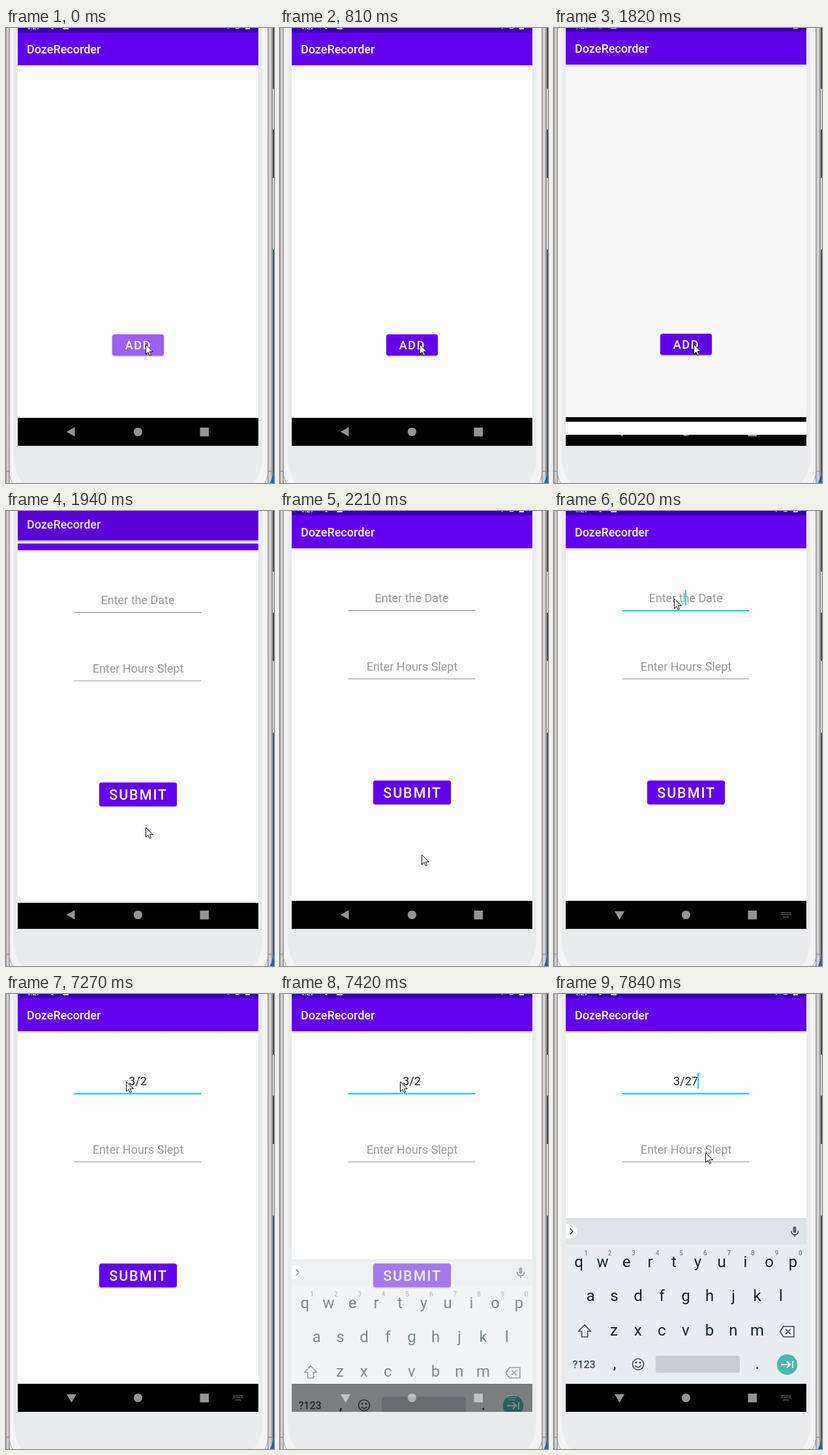
Recreate the animation shown at these times as an HTML page. Size 411 px wide and 698 px high, loop 7.99 s.

```html
<!DOCTYPE html>
<html lang="en">
<head>
<meta charset="utf-8">
<title>Phone form</title>
<style>
html, body { margin: 0; width: 100%; height: 100%; overflow: hidden; background: #e9ebec; }
svg { display: block; width: 411px; height: 698px; font-family: Roboto, sans-serif; }
.title { font-weight: 500; font-size: 18px; fill: #fff; }
.btn { font-weight: 500; letter-spacing: .0893em; fill: #fff; }
.raised { filter: drop-shadow(0 1px 1px rgba(0, 0, 0, .35)); }
.field { font-size: 18px; text-anchor: middle; }
.hint { fill: #9b9b9b; }
.key { font-size: 24px; text-anchor: middle; fill: #14242b; }
.alt { font-size: 10px; font-weight: 500; text-anchor: middle; fill: #7d868b; }
.icon { fill: none; stroke: #3f4b50; stroke-width: 1.6; stroke-linejoin: round; stroke-linecap: round; }
</style>
</head>
<body>
<svg viewBox="0 0 411 698">
  <defs>
    <clipPath id="screen"><rect x="18" y="0" width="369" height="641"/></clipPath>
    <clipPath id="reveal"><rect id="revealBox" x="18" y="0" width="369" height="641"/></clipPath>
    <linearGradient id="barShadow" x1="0" y1="0" x2="0" y2="1">
      <stop offset="0" stop-opacity=".2"/><stop offset="1" stop-opacity="0"/>
    </linearGradient>
    <g id="bars">
      <rect x="18" y="-20" width="369" height="27" fill="#3700b3"/>
      <g fill="#e8e0f8">
        <text x="31" y="1.6" font-size="11" font-weight="500">4:27</text>
        <rect x="69.5" y="-1" width="3" height="2.5"/>
        <rect x="87" y="-2" width="9" height="4" rx="1"/>
        <rect x="340" y="-1" width="1.5" height="2"/>
        <rect x="352" y="-1" width="6" height="2"/>
        <rect x="367" y="-2" width="7" height="4"/>
      </g>
      <rect x="18" y="57" width="369" height="4" fill="url(#barShadow)"/>
      <rect x="18" y="6.6" width="369" height="50.4" fill="#6200ee"/>
      <text class="title" x="32" y="38.5">DozeRecorder</text>
    </g>
  </defs>

  <g id="frame"></g>

  <g clip-path="url(#screen)">
    <rect x="18" y="0" width="369" height="641"/>
    <g id="home">
      <rect x="18" y="-20" width="369" height="618" fill="#fefefe"/>
      <use href="#bars"/>
      <rect id="add" class="raised" x="163" y="470" width="79" height="32.5" rx="3.5"/>
      <text class="btn" x="182.7" y="493" font-size="18">ADD</text>
    </g>
    <rect id="dim" x="18" y="0" width="369" height="598"/>

    <g fill="#949494">
      <path id="back"/>
      <circle cx="202.4" cy="619.5" r="6.6"/>
      <rect x="297.5" y="613" width="13.5" height="13.5"/>
      <path id="imeIcon" fill="none" stroke="#949494" stroke-width="1.6" stroke-dasharray="1.6 1.4"
        d="M349 616.3h14M349 619.3h14M352 622.8h8"/>
    </g>

    <g id="form" clip-path="url(#reveal)">
      <g id="formBody">
        <rect x="18" y="0" width="369" height="598" fill="#fefefe"/>
        <use href="#bars"/>
        <text id="date" class="field" x="202" y="140"></text>
        <rect id="line" x="104.5" width="195"/>
        <rect id="caret" y="121" width="1.8" height="24" fill="#03dac5"/>
        <text class="field hint" x="202.5" y="245">Enter Hours Slept</text>
        <rect x="104.5" y="257" width="195" height="1.1" fill="#a2a2a2"/>
        <rect class="raised" x="143" y="413.5" width="119" height="36.5" rx="3.5" fill="#6200ee"/>
        <text class="btn" x="158.2" y="440" font-size="21.55">SUBMIT</text>
      </g>
    </g>

    <g id="keyboard"></g>
  </g>

  <path id="pointer" d="M0 0V14.9L3.5 11.7L5.8 16.9L8 16L5.8 10.9H10.8Z"
    fill="#fff" stroke="#111" stroke-linejoin="round"/>
</svg>
<script>
const $ = id => document.getElementById(id);
const set = (id, attrs) => { for (const k in attrs) $(id).setAttribute(k, attrs[k]); };
const rect = (x, y, w, h, fill, extra = '') =>
  `<rect x="${x}" y="${y}" width="${w}" height="${h}" fill="${fill}" ${extra}/>`;
const label = (cls, x, y, s) => `<text class="${cls}" x="${x}" y="${y}">${s}</text>`;

function buildFrame() {
  const column = ([x, w, c]) => rect(x, 0, w, 698, c);
  const edges = [
    [0, 1, '#989395'], [1, 3, '#d5d0d1'], [4, 2, '#a8a2a4'],
    [401, 2, '#a8a2a4'], [403, 4, '#d5d0d1'], [407, 2.5, '#989395']
  ];
  const desktop = [[0, 93, '#23262b'], [93, 63, '#d4d6d8'], [156, 74, '#1c1e26'],
                   [230, 110, '#dddee0'], [340, 358, '#14384a']];
  $('frame').innerHTML =
    rect(0, 0, 411, 698, '#f4f4f5') + edges.map(column).join('') +
    '<path d="M12 0H393V658Q392 684 380 698H25Q13 684 12 658Z" fill="#e9ebec"/>' +
    desktop.map(([y, h, c]) => rect(409.5, y, 1.5, h, c)).join('') +
    '<path d="M0 680H5M402 680H408" stroke="#7d787a"/>' +
    '<path d="M5 681Q6 692 10 698M402 681Q401 692 397 698" fill="none" stroke="#a8a2a4"/>' +
    '<path d="M411 681V698H405Z" fill="#2a64a0"/>';
}

function buildKeyboard() {
  const row = (keys, x, y, step) => [...keys].map((k, i) => label('key', x + i * step, y, k)).join('');
  const icon = d => `<path class="icon" d="${d}"/>`;
  $('keyboard').innerHTML =
    rect(18, 344, 369, 254, '#e9edf0') + rect(18, 344, 369, 40, '#e0e4e7') +
    rect(18, 344, 369, 1.5, '#d6dbde') +
    '<path d="M18 353H25A11 11 0 0 1 25 375H18Z" fill="#fff"/>' +
    icon('M25 360L29 364.2L25 368.4') +
    rect(366.5, 356.5, 5, 10, '#59666b', 'rx="2.5"') +
    icon('M363.8 364A5.4 5.4 0 0 0 374.6 364M369.2 369.5V372') +
    row('qwertyuiop', 38, 418.5, 36.5) +
    [...'1234567890'].map((d, i) => label('alt', 49 + i * 36.55, 401, d)).join('') +
    row('asdfghjkl', 56, 471, 36.5) +
    row('zxcvbnm', 92, 524, 36.6) +
    icon('M47 507.5L56.5 517.5H51.5V526H42.5V517.5H37.5Z') +
    icon('M352 510H368V526H352L346.5 518ZM355.5 514.5L362.5 521.5M362.5 514.5L355.5 521.5') +
    '<text x="28.5" y="574" font-size="16" font-weight="500" fill="#3f4b50">?123</text>' +
    label('key', 93, 575, ',') + label('key', 312, 575, '.') +
    '<circle class="icon" cx="129" cy="568" r="8.5"/>' +
    icon('M125 570.5Q129 575 133 570.5') +
    '<circle cx="126" cy="565.5" r="1.4" fill="#3f4b50"/><circle cx="132" cy="565.5" r="1.4" fill="#3f4b50"/>' +
    rect(156, 555, 129, 26, '#c9cdd1', 'rx="3"') +
    '<circle cx="357.5" cy="568.5" r="15.7" fill="#4db6ac"/>' +
    '<path d="M348 568.5H362M357 563.5L362 568.5L357 573.5M366 563V574" fill="none" stroke="#fff" stroke-width="2"/>';
}

const LOOP = 7990;
const HINT = 'Enter the Date';

// Each step changes part of the state and then holds.
// open: form reveal progress, kb: [offset, opacity]
const STEPS = [
  [0, { add: '#9d5ff4', open: 0, dim: 0, at: [214.5, 485.5], text: '', focus: 0, caret: 0, ime: 0, kb: [0, 0] }],
  [810, { add: '#6200ee' }],
  [1820, { open: .035, dim: .027 }],
  [1940, { open: .92, dim: .09 }],
  [2060, { open: .985, dim: .1 }],
  [2210, { open: 1, at: [217.5, 527.5] }],
  [2330, { at: [220.5, 524.5] }],
  [2480, { at: [241.5, 450.5] }],
  [2630, { at: [235.5, 252.5] }],
  [2780, { at: [205.5, 153.5] }],
  [2930, { at: [183.5, 119.5] }],
  [3050, { at: [181.5, 125.5] }],
  [3220, { at: [185.5, 130.5] }],
  [3340, { at: [184.5, 134.5] }],
  [3630, { focus: 1, caret: 1 }],
  [4020, { caret: 0 }],
  [4550, { caret: 1 }],
  [5110, { caret: 0 }],
  [5610, { caret: 1 }],
  [6020, { ime: 1 }],
  [6170, { text: '3' }],
  [6420, { text: '3/' }],
  [6720, { text: '3/2' }],
  [7270, { caret: 0 }],
  [7420, { kb: [63, .53] }],
  [7570, { text: '3/27', caret: 1, kb: [0, 1], at: [212.5, 188.5] }],
  [7720, { at: [227.5, 231.5] }],
  [7840, { at: [232.5, 243.5] }]
];

const stateAt = t => Object.assign({}, ...STEPS.filter(s => s[0] <= t).map(s => s[1]));
const shift = (x, y) => `translate(${x} ${y})`;
const show = on => on ? 'inline' : 'none';

function draw(t) {
  const s = stateAt(t);
  const rest = 1 - s.open;
  set('add', { fill: s.add });
  set('home', { transform: shift(0, -Math.ceil(13 * s.open)) });
  set('dim', { opacity: s.dim });
  set('form', { display: show(s.open > 0) });
  set('formBody', { transform: shift(0, Math.ceil(26 * rest)) });
  set('revealBox', { y: Math.round(626 * rest) });

  $('date').textContent = s.text || HINT;
  set('date', { fill: s.text ? '#222' : '#9b9b9b' });
  set('line', s.focus ? { y: 152, height: 2, fill: '#03dac5' } : { y: 152, height: 1.1, fill: '#858585' });
  const half = s.text ? $('date').getComputedTextLength() / 2 : 0;
  set('caret', { x: 201.2 + half, display: show(s.caret) });

  set('back', { d: s.ime ? 'M93 614H108L100.5 627Z' : 'M93 619.5L105.5 612.3V626.7Z' });
  set('imeIcon', { display: show(s.ime) });
  set('keyboard', { transform: shift(0, s.kb[0]), opacity: s.kb[1], display: show(s.kb[1] > 0) });
  set('pointer', { transform: shift(...s.at) });
}

buildFrame();
buildKeyboard();
const start = performance.now();
function tick() {
  draw((performance.now() - start) % LOOP);
  requestAnimationFrame(tick);
}
tick();
</script>
</body>
</html>
```
